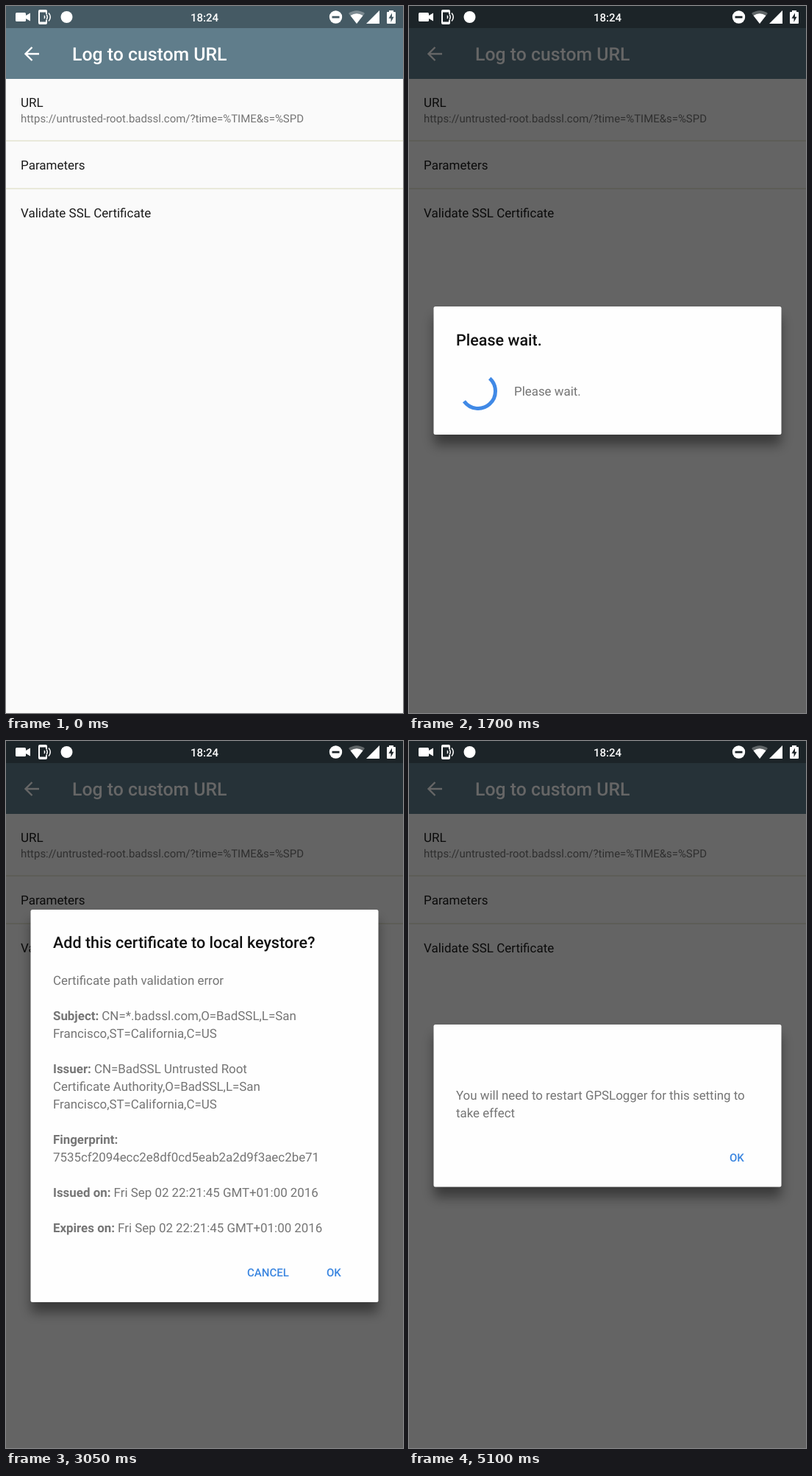
Write an HTML page that moves like this. It is 540 by 960 pixels and loops after 5.85 s.

```html
<!DOCTYPE html>
<html lang="en">
<head>
<meta charset="utf-8">
<title>Certificate validation</title>
<style>
html, body { margin: 0; width: 100%; height: 100%; overflow: hidden; background: #fafafa; }
svg { display: block; width: 100vw; height: 100vh; }
text { font-family: Roboto, "Noto Sans", sans-serif; font-size: 17px; text-rendering: geometricPrecision; white-space: pre; }
.medium { font-weight: 500; }
.bold { font-weight: 700; }
.heading { font-size: 21.5px; font-weight: 500; fill: #111; }
.button { font-size: 15px; font-weight: 500; fill: #3b86e0; }
.message { font-size: 16.9px; fill: #757575; }
</style>
</head>
<body>
<svg viewBox="0 0 540 960">
  <rect data-tone="page" width="540" height="960"/>
  <rect id="press" y="249" width="540" height="64" fill="#808080"/>
  <rect data-tone="bar" y="29" width="540" height="70"/>
  <rect data-tone="status" width="540" height="30"/>

  <g fill="#fff">
    <rect x="13" y="9" width="14" height="12" rx="1.5"/>
    <path d="M26 13.5L33 9.5V20.5L26 16.5Z"/>
    <path fill-rule="evenodd" d="M46 5H54Q56 5 56 7V11H54V8.5H46V21.5H54V19H56V23Q56 25 54 25H46Q44 25 44 23V7Q44 5 46 5Z"/>
    <g fill="none" stroke="#fff" stroke-width="1.5">
      <path d="M52 13Q53.5 15 52 17M55 11.5Q57.5 15 55 18.5M58 9.5Q62.5 15 58 20.5"/>
    </g>
    <circle cx="82.5" cy="15" r="8"/>
    <text class="medium" x="270" y="20.5" text-anchor="middle" style="font-size:15px">18:24</text>
    <circle cx="448.5" cy="15" r="8.7"/>
    <path d="M466 10Q477 2.5 488 10L477 24Z" fill-opacity=".3"/>
    <path d="M468.5 13Q477 7.5 485.5 13L477 24Z"/>
    <path d="M508 6V24H490Z"/>
    <path d="M521 6H527V8H529Q530 8 530 9V23Q530 24 529 24H519Q518 24 518 23V9Q518 8 519 8H521Z"/>
  </g>
  <rect data-tone="status" x="443.5" y="13.7" width="10" height="2.8"/>
  <path data-tone="status" d="M525 9.5L520.5 16.8H523.5V22L527.5 14.8H525Z"/>

  <path data-tone="title" data-line d="M45 65H27M35.5 56L26.5 65L35.5 74" fill="none" stroke-width="2.4"/>
  <text data-tone="title" class="medium" x="90" y="74" style="font-size:24.8px">Log to custom URL</text>
  <text data-tone="ink" x="20" y="137">URL</text>
  <text data-tone="sub" x="20" y="158" style="font-size:14.95px">https://untrusted-root.badssl.com/?time=%TIME&amp;s=%SPD</text>
  <rect data-tone="rule" y="182.3" width="540" height="1.5"/>
  <text data-tone="ink" x="20" y="222">Parameters</text>
  <rect data-tone="rule" y="247.2" width="540" height="1.5"/>
  <text data-tone="ink" x="20" y="287">Validate SSL Certificate</text>

  <g id="dialogs"></g>
  <circle id="touch" r="14" stroke-width="1.4"/>
</svg>
<script>
const LOOP = 5850, STEP = 50;
const $ = id => document.getElementById(id);
const clamp = v => Math.min(1, Math.max(0, v));
const ramp = (t, a, b) => clamp((t - a) / (b - a));
const smooth = v => v * v * (3 - 2 * v);

const DIM = 0.6;
const tones = {
  page: [250, 250, 250],
  bar: [96, 125, 139],
  status: [69, 90, 100],
  title: [255, 255, 255],
  ink: [28, 28, 28],
  sub: [117, 117, 117],
  rule: [228, 228, 208]
};

const label = (cls, x, y, text) => `<text class="${cls}" x="${x}" y="${y}">${text}</text>`;
const heading = (y, text) => label("heading", 64, y, text);
const button = (x, y, text) => label("button", x, y, text);
const line = (y, text, x = 64) => label("message", x, y, text);
const field = (y, name, value) => line(y, `<tspan class="bold">${name}:</tspan> ${value}`);

function dialog(id, top, bottom, content) {
  const h = bottom - top;
  return `<g id="${id}">
    <rect x="34" y="${top + 14}" width="472" height="${h}" rx="4" opacity=".42" style="filter:blur(8px)"/>
    <rect x="33.5" y="${top}" width="473" height="${h}" rx="2.5" fill="#fefefe"/>
    ${content}</g>`;
}

$("dialogs").innerHTML =
  dialog("wait", 408, 582,
    heading(461, "Please wait.") + line(529, "Please wait.", 143) +
    `<path id="spinner" fill="none" stroke="#4089e6" stroke-width="5"/>`) +
  dialog("cert", 229, 762,
    heading(281, "Add this certificate to local keystore?") +
    line(331, "Certificate path validation error") +
    field(379, "Subject", "CN=*.badssl.com,O=BadSSL,L=San") +
    line(403, "Francisco,ST=California,C=US") +
    field(451, "Issuer", "CN=BadSSL Untrusted Root") +
    line(475, "Certificate Authority,O=BadSSL,L=San") +
    line(499, "Francisco,ST=California,C=US") +
    field(547, "Fingerprint", "") +
    line(571, "7535cf2094ecc2e8df0cd5eab2a2d9f3aec2be71") +
    field(619, "Issued on", "Fri Sep 02 22:21:45 GMT+01:00 2016") +
    field(667, "Expires on", "Fri Sep 02 22:21:45 GMT+01:00 2016") +
    button(328, 727, "CANCEL") + button(436, 727, "OK")) +
  dialog("restart", 385, 605.5,
    line(487, "You will need to restart GPSLogger for this setting to") +
    line(511, "take effect") + button(436, 571, "OK"));

const painted = [...document.querySelectorAll("[data-tone]")];

function paint(dim) {
  for (const el of painted) {
    const rgb = tones[el.dataset.tone].map(v => Math.round(v * (1 - DIM * dim)));
    el.setAttribute("line" in el.dataset ? "stroke" : "fill", `rgb(${rgb})`);
  }
}

function show(id, enter, leave) {
  const scale = 0.92 + 0.08 * enter;
  const el = $(id);
  el.setAttribute("opacity", enter * (1 - leave));
  el.setAttribute("transform", `translate(270 495) scale(${scale}) translate(-270 -495)`);
}

function spin(t) {
  const point = deg => {
    const a = deg * Math.PI / 180;
    return `${94 + 23.5 * Math.cos(a)} ${523 + 23.5 * Math.sin(a)}`;
  };
  const from = -48 + 0.1755 * (t - 1700);
  const span = 8 + 262 * (1 - Math.pow(1 - smooth(ramp(t, 1310, 2090)), 1.75));
  $("spinner").setAttribute("d", `M${point(from)}A23.5 23.5 0 ${span > 180 ? 1 : 0} 1 ${point(from + span)}`);
}

function tap(t) {
  const second = t > 3000;
  const el = $("touch");
  el.setAttribute("cx", second ? 463 : 235);
  el.setAttribute("cy", second ? 730 : 293);
  el.setAttribute("fill", second ? "rgba(255,255,255,.25)" : "rgba(255,255,255,.8)");
  el.setAttribute("stroke", second ? "#e6e6e6" : "#d4d4e4");
  const on = (t >= 1350 && t < 1450) || (t >= 3750 && t < 3950);
  el.setAttribute("opacity", on ? 1 : 0);
}

function draw(t) {
  paint(smooth(ramp(t, 1450, 1650)));
  $("press").setAttribute("opacity", 0.18 * ramp(t, 1350, 1450) * (1 - ramp(t, 1450, 1600)));
  show("wait", smooth(ramp(t, 1450, 1650)), ramp(t, 1850, 1950));
  show("cert", smooth(ramp(t, 1850, 2000)), ramp(t, 3900, 4050));
  show("restart", smooth(ramp(t, 3950, 4150)), 0);
  spin(t);
  tap(t);
}

const begin = performance.now();
function tick() {
  const t = (performance.now() - begin) % LOOP;
  draw(Math.floor(t / STEP) * STEP);
  requestAnimationFrame(tick);
}
tick();
</script>
</body>
</html>
```
